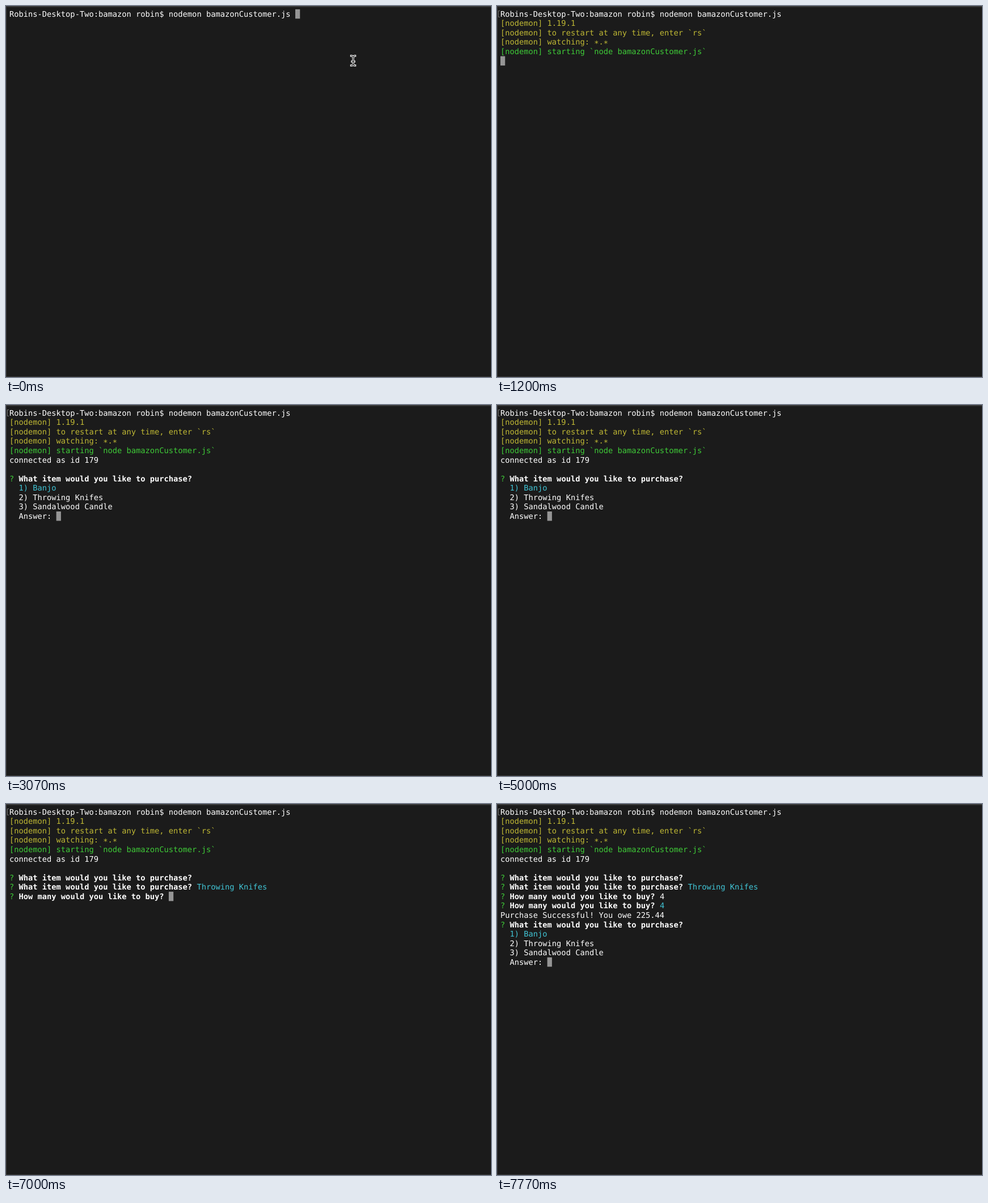
An HTML page with a canvas that plays this animation: 855 by 655 pixels, repeating every 8 s.

```html
<!DOCTYPE html>
<html lang="en">
<head>
<meta charset="utf-8">
<title>Terminal session</title>
<style>
  html, body { margin: 0; width: 100%; height: 100%; overflow: hidden; background: #1b1b1b; }
  canvas { display: block; }
</style>
</head>
<body>
<canvas id="stage" width="855" height="655"></canvas>
<script>
const ctx = document.getElementById('stage').getContext('2d');
const LOOP = 8000;
const LEFT = 6, TOP = 5.8, COL = 8.262, ROW = 16.56;
const FONT = '13.72px "DejaVu Sans Mono", monospace';
const WHITE = '#ffffff', YELLOW = '#bfb834', GREEN = '#3fcb38', CYAN = '#41c5d6';

// A row is a list of segments: [text, color, bold, drop]
const plain = text => [[text, WHITE]];
const log = (text, color) => [['[nodemon] ' + text, color]];
const ask = (text, answer = '', color = CYAN) =>
  [['? ', GREEN], [text + ' ', WHITE, true], [answer, color]];

const ITEM = 'What item would you like to purchase?';
const COUNT = 'How many would you like to buy?';

const prompt = [plain('Robins-Desktop-Two:bamazon robin$ nodemon bamazonCustomer.js ')];
const banner = [
  ...prompt,
  log('1.19.1', YELLOW),
  log('to restart at any time, enter `rs`', YELLOW),
  [['[nodemon] watching: ', YELLOW], ['*', YELLOW, false, 2.5], ['.', YELLOW], ['*', YELLOW, false, 2.5]],
];
const started = [...banner, log('starting `node bamazonCustomer.js`', GREEN)];
const connected = [...started, plain('connected as id 179'), []];
const menu = (typed = '') => [
  ask(ITEM),
  [['  1) Banjo', CYAN]],
  plain('  2) Throwing Knifes'),
  plain('  3) Sandalwood Candle'),
  plain('  Answer: ' + typed),
];
const chosen = [...connected, ask(ITEM), ask(ITEM, 'Throwing Knifes')];
const counted = [...chosen, ask(COUNT, '4', WHITE)];
const confirmed = [...counted, ask(COUNT, '4')];
const newline = [[]];

// The block cursor follows the last row of each screen.
const steps = [
  [0, prompt],
  [630, [...prompt, ...newline]],
  [1170, [...banner, ...newline]],
  [1200, [...started, ...newline]],
  [1570, [...connected, ...menu()]],
  [5300, [...connected, ...menu('2')]],
  [5670, [...connected, ...menu('2'), ...newline]],
  [5700, [...chosen, ask(COUNT)]],
  [7330, counted],
  [7670, [...counted, ...newline]],
  [7700, [...confirmed, ...newline]],
  [7730, [...confirmed, plain('Purchase Successful! You owe 225.44'), ...menu()]],
];

function drawWindow() {
  ctx.fillStyle = '#1b1b1b';
  ctx.fillRect(0, 0, 855, 655);
  ctx.fillStyle = '#393939';
  ctx.fillRect(0, 0, 855, 2);
  ctx.fillRect(0, 0, 1, 655);
  ctx.fillRect(0, 654, 855, 1);
}

function drawRows(rows) {
  let col = 0;
  rows.forEach((row, i) => {
    col = 0;
    for (const [text, color, bold, drop = 0] of row) {
      ctx.font = (bold ? 'bold ' : '') + FONT;
      ctx.fillStyle = color;
      ctx.fillText(text, LEFT + col * COL, TOP + i * ROW + 13 + drop);
      col += text.length;
    }
  });
  ctx.fillStyle = '#959595';
  ctx.fillRect(LEFT + col * COL, TOP + (rows.length - 1) * ROW, COL, 16.5);
}

function drawMark() {
  ctx.strokeStyle = '#777777';
  ctx.lineWidth = 1;
  ctx.beginPath();
  ctx.moveTo(5, 8.5);
  ctx.lineTo(2.5, 8.5);
  ctx.lineTo(2.5, 19.5);
  ctx.lineTo(5, 19.5);
  ctx.stroke();
}

function drawPointer(x, y) {
  const beam = new Path2D();
  for (const s of [-1, 1]) {
    beam.moveTo(x - 3.5, y + s * 8.5);
    beam.quadraticCurveTo(x, y + s * 8.5, x, y + s * 5.5);
    beam.quadraticCurveTo(x, y + s * 8.5, x + 3.5, y + s * 8.5);
  }
  beam.moveTo(x, y - 6);
  beam.lineTo(x, y + 6);
  beam.moveTo(x - 2, y + 1.5);
  beam.lineTo(x + 2, y + 1.5);
  ctx.lineCap = 'square';
  for (const [color, width] of [['#f4f4f4', 3.4], ['#101010', 1.2]]) {
    ctx.strokeStyle = color;
    ctx.lineWidth = width;
    ctx.stroke(beam);
  }
  ctx.lineCap = 'butt';
}

function draw(t) {
  drawWindow();
  drawRows(steps.filter(([at]) => at <= t).pop()[1]);
  if (t < 630) drawPointer(612, 96.5);
  else drawMark();
}

ctx.textRendering = 'geometricPrecision';
const start = performance.now();
function tick() {
  draw((performance.now() - start) % LOOP);
  requestAnimationFrame(tick);
}
tick();
</script>
</body>
</html>
```
